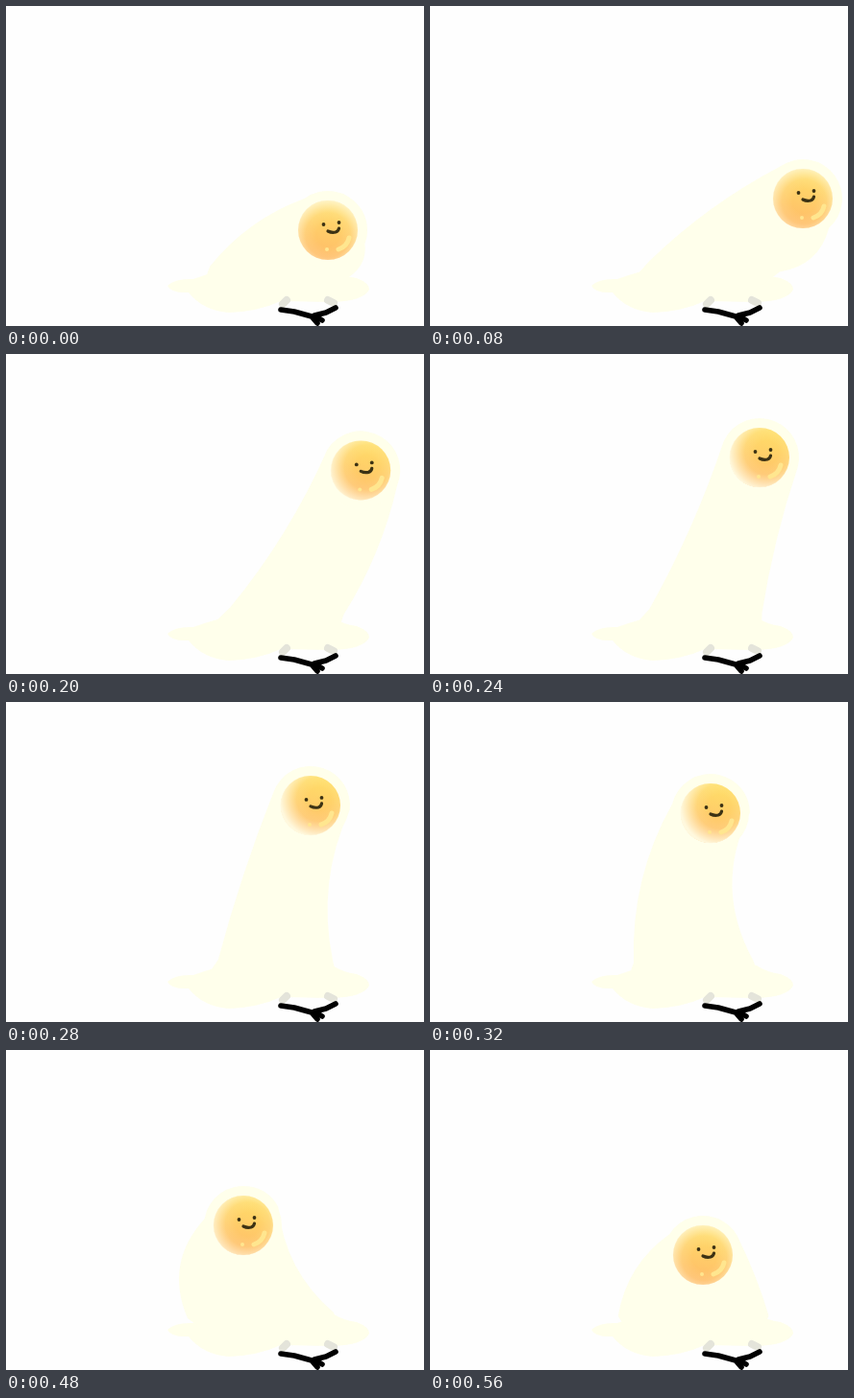
Write an HTML page with a canvas that moves like this. It is 435 by 334 pixels and loops after 640 ms.

```html
<!DOCTYPE html>
<html lang="en">
<head>
<meta charset="utf-8">
<style>
html, body { margin: 0; width: 100%; height: 100%; overflow: hidden; background: #fefefe; }
canvas { display: block; }
</style>
</head>
<body>
<canvas id="stage" width="435" height="334"></canvas>
<script>
const ctx = document.getElementById('stage').getContext('2d');
const { sin, cos, atan2, acos, hypot, min, floor, PI } = Math;
const WHITE = '#ffffeb', INK = '#3c3214', SHINE = '#ffe68f';
const LOOP = 640, STEP = 40, HEAD_RADIUS = 41;

// Key points of the closed curve the yolk travels along, 80 ms apart.
const ORBIT = [[335, 234], [388, 201], [389, 143], [343, 108],
  [292, 116], [254, 146], [247, 183], [284, 214]];

const PUDDLE = new Path2D('M168 292Q176 284 195 285Q260 260 340 275Q350 282 365 284Q378 289 378 296' +
  'Q372 308 340 309L286 308Q262 319 232 320Q205 318 190 299Q172 300 168 292');

function headAt(u) {
  const k = floor(u), t = u - k;
  const [a, b, c, d] = [7, 8, 9, 10].map(n => ORBIT[(k + n) % 8]);
  return b.map((p, i) => p + t / 2 * (c[i] - a[i] +
    t * (2 * a[i] - 5 * p + 4 * c[i] - d[i] + t * (3 * (p - c[i]) + d[i] - a[i]))));
}

function stroke(path, color, width) {
  ctx.strokeStyle = color;
  ctx.lineWidth = width;
  ctx.lineCap = ctx.lineJoin = 'round';
  ctx.stroke(new Path2D(path));
}

function disc(x, y, r, fill) {
  ctx.beginPath();
  ctx.arc(x, y, r, 0, PI * 2);
  ctx.fillStyle = fill;
  ctx.fill();
}

// Angle on the head where a line from the given base point touches it.
function tangentAngle([bx, by], [x, y], side) {
  const distance = hypot(bx - x, by - y);
  return atan2(by - y, bx - x) + side * acos(min(1, HEAD_RADIUS / distance));
}

// Curve whose middle bulges out by a fraction of its length.
function bulgeTo([ax, ay], [bx, by], bulge) {
  ctx.quadraticCurveTo((ax + bx) / 2 + 2 * bulge * (by - ay),
    (ay + by) / 2 - 2 * bulge * (bx - ax), bx, by);
}

function drawBody(head, angle) {
  const s = sin(angle), c = cos(angle);
  const left = [212 + 23 * s, 272 - 8 * s];
  const right = [349 + 13 * c + 8 * s, 274 + 5 * c];
  const from = tangentAngle(left, head, 1), to = tangentAngle(right, head, -1);
  const rim = a => [head[0] + HEAD_RADIUS * cos(a), head[1] + HEAD_RADIUS * sin(a)];
  ctx.fillStyle = WHITE;
  ctx.fill(PUDDLE);
  ctx.beginPath();
  ctx.moveTo(...left);
  bulgeTo(left, rim(from), .07 - .09 * s + .03 * sin(2 * angle));
  ctx.arc(...head, HEAD_RADIUS, from, to);
  bulgeTo(rim(to), right, .13 * c + .1 * s);
  ctx.lineTo(345, 292);
  ctx.lineTo(205, 292);
  ctx.fill();
  disc(...head, HEAD_RADIUS - 1, WHITE);
}

function drawYolk(head, angle) {
  ctx.save();
  ctx.translate(...head);
  const tone = ctx.createLinearGradient(8, -31, -6, 31);
  tone.addColorStop(0, '#ffdf68');
  tone.addColorStop(.5, '#ffcd69');
  tone.addColorStop(1, '#ffba68');
  disc(0, 0, 31, tone);
  // The pale side turns from the top to the lower left and back.
  const fx = 4.5 - 4.5 * cos(angle), fy = 6 * cos(angle) - 1;
  const fade = ctx.createRadialGradient(fx, fy, 12, fx, fy, 40);
  fade.addColorStop(0, 'rgba(255,248,220,0)');
  fade.addColorStop(.4, 'rgba(255,248,220,.15)');
  fade.addColorStop(1, 'rgba(255,250,225,.97)');
  disc(0, 0, 31.5, fade);
  stroke('M11 20Q20 17 22 8', SHINE, 5);
  disc(-1, 20, 2, SHINE);
  disc(-4.5, -6, 1.9, INK);
  disc(11.5, -8, 1.9, INK);
  stroke('M0 1Q4 3 8 2Q11 1 11.5 -2', INK, 3.2);
  ctx.restore();
}

function drawLegs() {
  stroke('M288 311L292 307M335 307L341 310', '#e4e4da', 8);
  stroke('M286 317L300 319L318 324L324 331M343 315L333 320L321 323L329 328', '#000', 5.6);
}

function frame(now) {
  const step = min(14, floor(now % LOOP / STEP));
  // Two poses share three steps here, the second one is held.
  const phase = step > 8 && step < 12 ? (step < 10 ? 9.33 : 10.67) : step;
  const head = headAt(phase / 2), angle = phase * PI / 8;
  ctx.fillStyle = '#fefefe';
  ctx.fillRect(0, 0, 435, 334);
  drawBody(head, angle);
  drawYolk(head, angle);
  drawLegs();
}

const start = performance.now();
function tick() {
  frame(performance.now() - start);
  requestAnimationFrame(tick);
}
tick();
</script>
</body>
</html>
```
